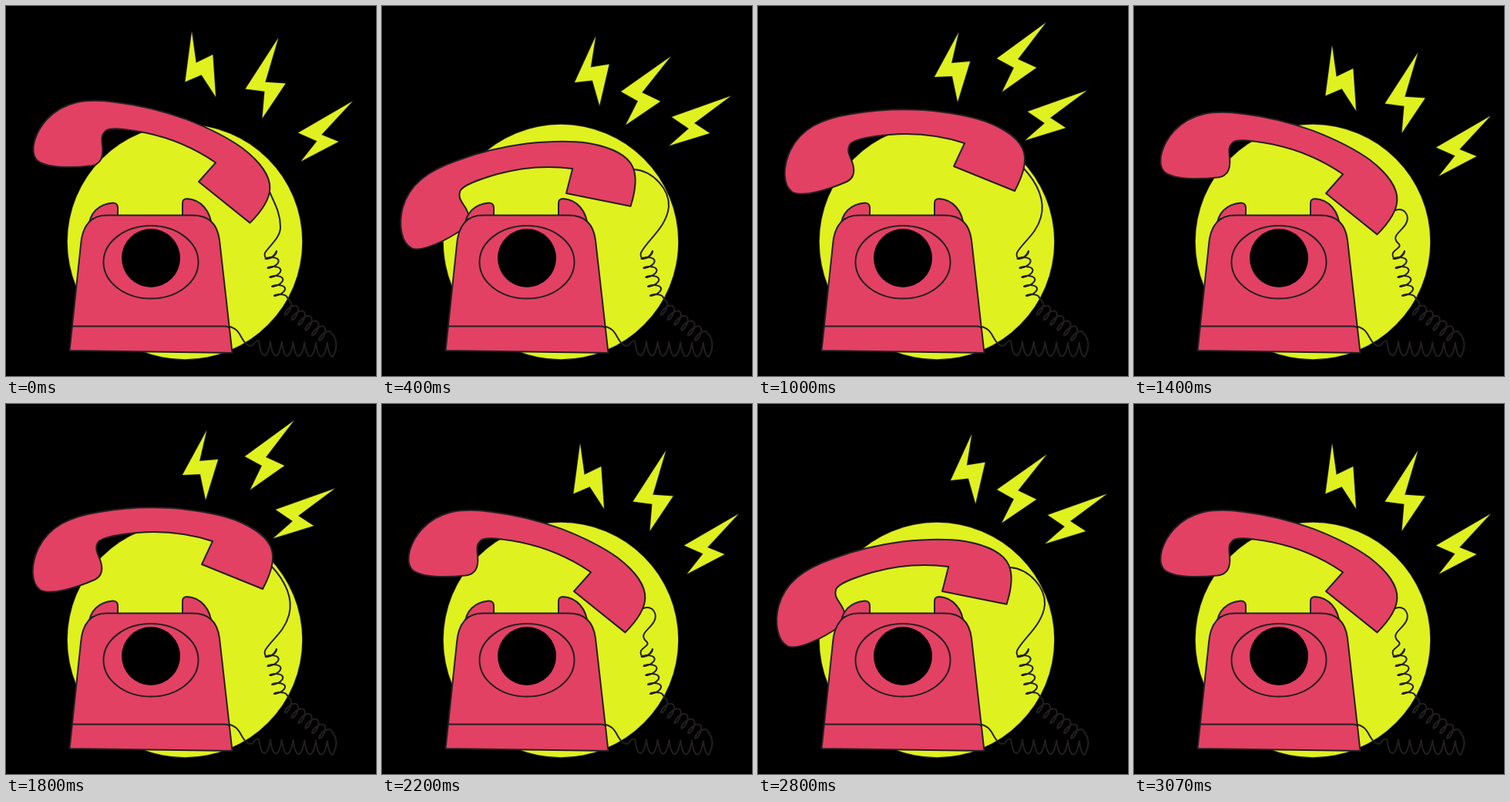
An HTML page that plays this animation: 480 px wide and 480 px high, repeating every 3190 ms.

```html
<!DOCTYPE html>
<html lang="en">
<head>
<meta charset="utf-8">
<title>Ringing telephone</title>
<style>
  html, body { margin: 0; width: 100%; height: 100%; overflow: hidden; background: #000; }
  svg { display: block; width: 100%; height: 100%; }
  path, circle, ellipse { stroke: #231f20; stroke-width: 2; stroke-linejoin: round; stroke-linecap: round; }
  .pink { fill: #e24163; }
  .lime { fill: #e0f120; paint-order: stroke; }
  .line { fill: none; }
</style>
</head>
<body>
<svg viewBox="0 0 480 480">
  <circle class="lime" cx="232" cy="306" r="152.2"/>

  <path id="lead" class="line"/>
  <path id="cord" class="line"/>

  <path id="handset" class="pink" d="M333 240 C341 225 349 205 345 190 C341 174 322 160 296 150
    C270 141 240 137 215 135 C180 133 150 135 122 140 C82 146 56 159 42 187 C32 208 32 232 44 241
    C58 249 92 238 115 228 C125 223 126 213 122 202 C118 192 115 187 119 180
    C124 172 150 169 170 167 C205 164 240 169 268 178 L254 208 Z"/>

  <path class="pink" d="M107 288 C108 268 121 257 138 255.5 Q145 255 145 262 V276 H112 Z"/>
  <path class="pink" d="M229 276 V256 Q229 250 235 250 C252 251 266 265 267 288 L257 276 Z"/>
  <path class="pink" d="M82.5 447 L97 310 Q100 271.5 131 271.5 H242 Q273 271.5 277 304 L293.5 450 Z"/>
  <path class="line" d="M86 415.5 H285 L290 417"/>
  <ellipse class="pink" cx="188" cy="332.3" rx="61.5" ry="47.3"/>
  <circle cx="188" cy="327" r="38" style="stroke:none"/>

  <!-- each bolt starts at its tip -->
  <path class="lime bolt" d="M0 0 L-31 57 L-8 56 L-1 89 L15 37 L-9 39 Z"/>
  <path class="lime bolt" d="M0 0 L-63 46 L-41 58 L-56 89 L-12 58 L-36 47 Z"/>
  <path class="lime bolt" d="M0 0 L-76 27 L-54 42 L-79 64 L-27 48 L-47 35 Z"/>
</svg>
<script>
  const LOOP = 3190, HOLD = 200;

  // handset and bolts: [x, y, angle] of their anchor points
  const poses = [
    { handset: [250, 228, 16.7],
      bolts: [[241, 34, -21], [353, 42, -21], [449, 124, -10.5]],
      lead: 'M340 235 C344 250 356 264 356 287 C356 300 343 310 336 320' },
    { handset: [254, 208, 0],
      bolts: [[260, 35, 0], [373, 22, 0], [426, 110, 0]],
      lead: 'M344 210 C363 230 373 253 367 274 C361 296 344 306 336 320' },
    { handset: [239, 243, -10.7],
      bolts: [[277, 40, -4], [374, 66, 1], [452, 117, 0]],
      lead: 'M327 212 C352 214 373 238 372 260 C370 286 344 304 336 320' },
    { handset: [249, 243, 16.7],
      bolts: [[257, 52, -21], [368, 61, -21], [462, 143, -10.5]],
      lead: 'M339 265 C351 261 358 272 353 282 C348 292 333 298 342 307 C349 313 340 314 336 320' }
  ];
  const LEAD_END = ' C333 330 345 331 351 318';

  const handset = document.getElementById('handset');
  const lead = document.getElementById('lead');
  const bolts = document.querySelectorAll('.bolt');

  // points of a spiral spring seen from the side, running from (x0, y0) to (x1, y1)
  function coil(x0, y0, x1, y1, turns, across, along) {
    const length = Math.hypot(x1 - x0, y1 - y0);
    const dx = (x1 - x0) / length, dy = (y1 - y0) / length;
    const points = [], steps = turns * 24;
    for (let i = 0; i <= steps; i++) {
      const angle = i / 24 * 2 * Math.PI;
      const s = length * i / steps + along * Math.sin(angle);
      const n = across * Math.cos(angle);
      points.push(`${(x0 + dx * s + dy * n).toFixed(1)} ${(y0 + dy * s - dx * n).toFixed(1)}`);
    }
    return points.join(' ');
  }

  document.getElementById('cord').setAttribute('d',
    `M${coil(343, 320, 357, 380, 5, 8, 3)} L${coil(363, 390, 416, 430, 6, 9, 4)}
     Q434 437 424 455 L${coil(424, 446, 328, 444, 6.5, 9, 2)}
     C321 432 323 444 314 440 C303 434 306 417 285 415`);

  const place = (el, [x, y, angle], ax = 0, ay = 0) =>
    el.setAttribute('transform', `translate(${x} ${y}) rotate(${angle}) translate(${-ax} ${-ay})`);

  function draw(now) {
    const pose = poses[Math.floor(now % LOOP / HOLD) % poses.length];
    place(handset, pose.handset, 254, 208);
    bolts.forEach((bolt, i) => place(bolt, pose.bolts[i]));
    lead.setAttribute('d', pose.lead + LEAD_END);
  }

  const start = performance.now();
  function tick() {
    draw(performance.now() - start);
    requestAnimationFrame(tick);
  }
  tick();
</script>
</body>
</html>
```
